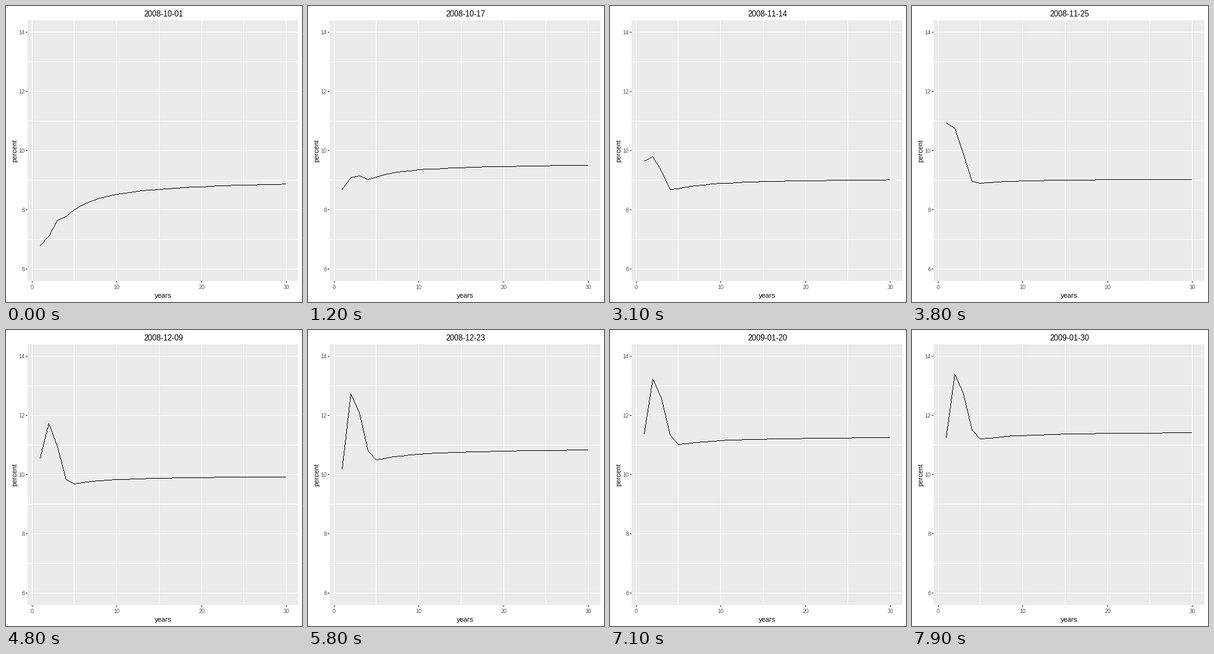
Write a matplotlib script that moves like this. It is 480 px wide and 480 px high and loops after 8 s.

```python
import numpy as np
import matplotlib.pyplot as plt
from matplotlib.animation import FuncAnimation
from matplotlib.patches import Rectangle

SIZE, DPI = 480, 80
PX = 72 / DPI  # points per pixel
FRAMES, STEP = 80, 100
LEFT, TOP, RIGHT, BOTTOM = 35, 23, 474, 446
MID_X, MID_Y = 255, 234.5

plt.rcParams.update({
    "font.family": "Liberation Sans",
    "text.hinting": "native",
    "text.hinting_factor": 1,
    "path.simplify": False,
})

# turning points of the market, in trading days, and the curve's shape there
KNOTS = [0, 12, 23, 38, 58, 71, 79]
LEVEL = [9.04, 9.58, 9.1, 9.05, 10.9, 11.3, 11.46]    # very long yield
SLOPE = [5.18, 2.34, 3.15, 0.75, 2.14, 1.55, 1.4]     # strength of the 1/t tail
HUMP = [0.66, 0.68, 1.18, 2.07, 2.89, 2.71, 2.63]     # bump at two years
SHORT = [6.79, 8.68, 8.16, 10.93, 10.18, 11.38, 11.26]  # one-year yield
YEARS = np.arange(1, 31)


def trading_days():
    days = np.arange("2008-10-01", "2009-01-31", dtype="datetime64[D]")
    new_year = np.arange("2009-01-01", "2009-01-12", dtype="datetime64[D]")
    closed = np.append(new_year, np.array(["2008-11-03", "2008-11-04"], "datetime64[D]"))
    is_open = np.is_busday(days, holidays=closed) | (days == np.datetime64("2008-11-01"))
    return days[is_open]


def sx(year):
    return 42.06 + 13.75 * year


def sy(percent):
    return 234.5 + 48 * (10 - percent)


def curve(day):
    level, slope, hump, short = (np.interp(day, KNOTS, k) for k in (LEVEL, SLOPE, HUMP, SHORT))
    decay = 0.66 - 0.25 / (1 + np.exp((48 - day) / 3))
    rates = level - slope / YEARS + hump * np.exp(-decay * np.abs(YEARS - 2) ** 2.2)
    rates[0] = short
    return rates


def pixel_line(xs, ys):
    """Jagged one-pixel polyline, as unit dashes separated by gaps."""
    pts = np.floor(np.column_stack([xs, ys]))
    cells = np.vstack([
        np.linspace(p, q, int(np.abs(q - p).max()), endpoint=False)
        for p, q in zip(pts, pts[1:])
    ]).round()
    col, row = cells.T
    gap = np.full_like(col, np.nan)
    return np.column_stack([col, col + 1, gap]).ravel(), np.repeat(row + 0.5, 3)


fig = plt.figure(figsize=(SIZE / DPI, SIZE / DPI), dpi=DPI, facecolor="white")
ax = fig.add_axes([0, 0, 1, 1])
ax.set_xlim(0, SIZE)
ax.set_ylim(SIZE, 0)
ax.axis("off")
ax.add_patch(Rectangle((LEFT, TOP), RIGHT - LEFT, BOTTOM - TOP, fc="#EBEBEB", lw=0))


def rule(xs, ys, color):
    return ax.plot(xs, ys, color=color, lw=PX, solid_capstyle="butt", snap=False)[0]


def label(x, y, text, size, color="black", **kw):
    return ax.text(x, y, text, fontsize=size * PX, color=color,
                   **{"ha": "center", "va": "baseline", **kw})


for year in range(0, 31, 5):
    x = np.floor(sx(year)) + 0.5
    rule([x, x], [TOP, BOTTOM], "white")
    if year % 10 == 0:
        rule([x, x], [BOTTOM, BOTTOM + 3], "#333333")
        label(x, 459, str(year), 9, "#4D4D4D")

for percent in range(6, 15):
    y = sy(percent)
    rule([LEFT, RIGHT], [y, y], "white")
    if percent % 2 == 0:
        rule([LEFT - 3, LEFT], [y, y], "#333333")
        label(30.5, y + 4, str(percent), 9, "#4D4D4D", ha="right")

label(MID_X, 473, "years", 11)
label(19.5, MID_Y, "percent", 11, rotation=90, ha="right", va="center")
title = label(MID_X, 17, "", 13)
line = rule([], [], "black")

DAYS = trading_days()


def draw(i):
    line.set_data(*pixel_line(sx(YEARS), sy(curve(i))))
    title.set_text(str(DAYS[i]))
    return line, title


anim = FuncAnimation(fig, draw, frames=FRAMES, interval=STEP, repeat=True, repeat_delay=0)
plt.show()
```
